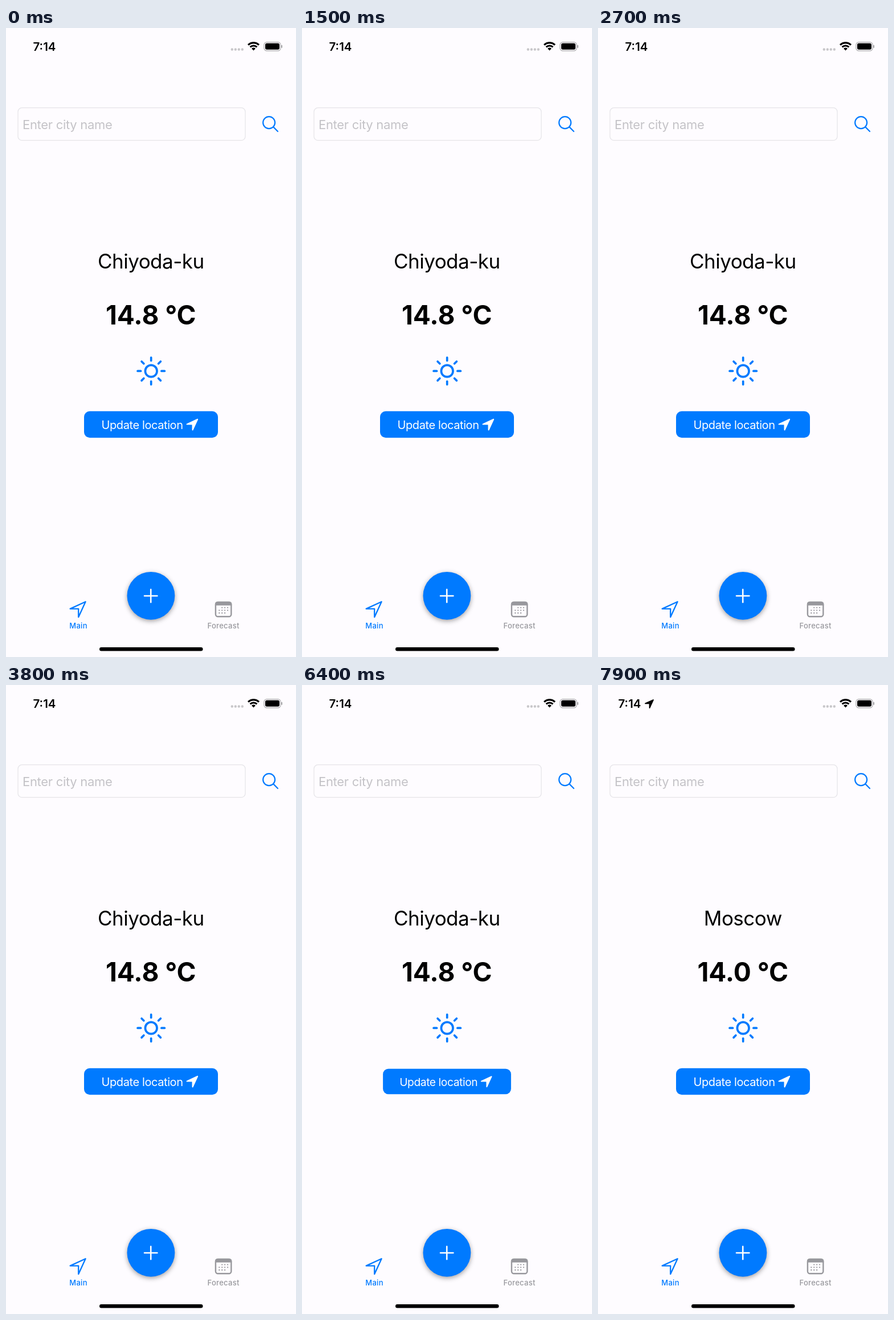
Recreate the animation shown at these times as an HTML page with a canvas. Size 509 by 1101 pixels, loop 8 s.

```html
<!DOCTYPE html>
<html lang="en">
<head>
<meta charset="utf-8">
<title>Weather app</title>
<style>
  html, body { margin: 0; width: 100%; height: 100%; overflow: hidden; background: #fefcff; }
  canvas { display: block; width: 509px; height: 1101px; }
</style>
</head>
<body>
<canvas id="stage"></canvas>
<script>
const W = 509, H = 1101, LOOP = 8000, STEP = 100;
const BG = '#fefcff', BLUE = '#007aff', GREY = '#98989d', BLACK = '#000', WHITE = '#fff';
const FORECAST_AT = 1600, MAIN_AT = 2500, PRESS_AT = 6300, UPDATE_AT = 6500;

const canvas = document.getElementById('stage');
const ratio = window.devicePixelRatio || 1;
canvas.width = W * ratio;
canvas.height = H * ratio;
const ctx = canvas.getContext('2d');

function text(str, x, y, size, { weight = 400, color = BLACK, align = 'left', spacing = 0 } = {}) {
  ctx.font = `${weight} ${size}px Inter, Roboto, sans-serif`;
  ctx.letterSpacing = spacing + 'px';
  ctx.textAlign = align;
  ctx.fillStyle = color;
  ctx.fillText(str, x, y);
}

function pen(color, width) {
  ctx.strokeStyle = color;
  ctx.lineWidth = width;
  ctx.lineCap = ctx.lineJoin = 'round';
}

function line(x1, y1, x2, y2) {
  ctx.beginPath();
  ctx.moveTo(x1, y1);
  ctx.lineTo(x2, y2);
  ctx.stroke();
}

function disc(x, y, r, color) {
  ctx.fillStyle = color;
  ctx.beginPath();
  ctx.arc(x, y, r, 0, Math.PI * 2);
  ctx.fill();
}

function ring(x, y, r) {
  ctx.beginPath();
  ctx.arc(x, y, r, 0, Math.PI * 2);
  ctx.stroke();
}

function box(x, y, w, h, r) {
  ctx.beginPath();
  ctx.roundRect(x, y, w, h, r);
}

function fillBox(x, y, w, h, r, color) {
  ctx.fillStyle = color;
  box(x, y, w, h, r);
  ctx.fill();
}

function arrow(x, y, size, color, width, solid) {
  ctx.beginPath();
  ctx.moveTo(x + size, y);
  ctx.lineTo(x, y + size * 0.46);
  ctx.lineTo(x + size * 0.54, y + size * 0.46);
  ctx.lineTo(x + size * 0.54, y + size);
  ctx.closePath();
  pen(color, width);
  ctx.stroke();
  if (solid) {
    ctx.fillStyle = color;
    ctx.fill();
  }
}

function wifi(x, y) {
  const mid = -Math.PI / 2, half = 0.76;
  ctx.fillStyle = BLACK;
  for (const [outer, inner] of [[15.4, 12.2], [10.2, 7], [5, 0]]) {
    ctx.beginPath();
    ctx.arc(x, y, outer, mid - half, mid + half);
    ctx.arc(x, y, inner, mid + half, mid - half, true);
    ctx.fill();
  }
}

function statusBar(located) {
  text('7:14', located ? 35.5 : 47.5, 40, 20.5, { weight: 600 });
  if (located) arrow(83, 26, 14, BLACK, 1.8, true);
  for (let i = 0; i < 4; i++) disc(396.8 + i * 6, 37.5, 2.2, '#c8c7ca');
  wifi(434.5, 39.6);
  pen('#a3a2a5', 1.2);
  box(453, 24.8, 29, 15, 4.6);
  ctx.stroke();
  fillBox(455, 26.8, 25, 11, 2.8, BLACK);
  fillBox(483.2, 29.8, 1.8, 5, 1, '#a3a2a5');
}

function searchRow() {
  pen('#e5e4e8', 1.2);
  box(21, 139.7, 399, 57, 7);
  ctx.stroke();
  text('Enter city name', 29, 176.5, 22, { color: '#c4c3c7', spacing: -0.3 });
  pen(BLUE, 2.2);
  ring(461.6, 165.6, 10.5);
  line(469.4, 173.4, 477, 181);
}

function sun(x, y) {
  pen(BLUE, 3.7);
  ring(x, y, 10.3);
  for (let i = 0; i < 8; i++) {
    const c = Math.cos(i * Math.PI / 4), s = Math.sin(i * Math.PI / 4);
    line(x + 18.2 * c, y + 18.2 * s, x + 23.6 * c, y + 23.6 * s);
  }
}

function pressScale(t) {
  const depth = 0.05, down = 150, settle = 136;
  const dt = t - PRESS_AT;
  if (dt < 0) return 1;
  if (dt < down) return 1 - depth * Math.sin(dt / down * Math.PI / 2);
  return 1 - depth * Math.exp((down - dt) / settle);
}

function updateButton(scale) {
  ctx.save();
  ctx.translate(254.5, 694);
  ctx.scale(scale, scale);
  fillBox(-117.5, -23.3, 235, 46.6, 10, BLUE);
  text('Update location', -87, 8, 20, { color: WHITE, spacing: -0.4 });
  arrow(63, -9, 18.6, WHITE, 2, true);
  ctx.restore();
}

function weather(t) {
  const updated = t >= UPDATE_AT;
  searchRow();
  text(updated ? 'Moscow' : 'Chiyoda-ku', 254.3, 420.5, 35, { align: 'center', spacing: -0.5 });
  text(updated ? '14.0 °C' : '14.8 °C', 254.3, 518.5, 46, { weight: 700, align: 'center' });
  sun(254.7, 600.4);
  updateButton(pressScale(t));
}

function calendar(color) {
  pen(color, 2.4);
  box(367.9, 1005, 27.4, 25.2, 4);
  ctx.stroke();
  fillBox(367, 1004, 29.2, 6.8, [4.5, 4.5, 0, 0], color);
  for (let i = 1; i < 11; i++) {
    disc(374.3 + (i % 4) * 4.9, 1014.6 + Math.floor(i / 4) * 4.7, 1.15, color);
  }
}

function tabBar(onMain) {
  const mainColor = onMain ? BLUE : GREY;
  const forecastColor = onMain ? GREY : BLUE;
  const label = { weight: 500, align: 'center', spacing: 0.3 };
  arrow(112.6, 1004.2, 27, mainColor, 2.3, false);
  text('Main', 127, 1051.3, 13, { ...label, color: mainColor });
  calendar(forecastColor);
  text('Forecast', 381.6, 1051.3, 13, { ...label, color: forecastColor });

  ctx.save();
  ctx.shadowColor = 'rgba(0,0,0,0.38)';
  ctx.shadowBlur = 8 * ratio;
  ctx.shadowOffsetY = 2.5 * ratio;
  disc(254.4, 993.8, 41.9, BLUE);
  ctx.restore();
  pen(WHITE, 2.6);
  line(243, 994, 265.4, 994);
  line(254.2, 982.8, 254.2, 1005.2);
  fillBox(164, 1084, 181.5, 6.5, 3.25, BLACK);
}

function draw(t) {
  const onMain = t < FORECAST_AT || t >= MAIN_AT;
  ctx.setTransform(ratio, 0, 0, ratio, 0, 0);
  ctx.fillStyle = BG;
  ctx.fillRect(0, 0, W, H);
  statusBar(t >= UPDATE_AT);
  if (onMain) weather(t);
  tabBar(onMain);
}

const start = performance.now();
function tick() {
  const t = (performance.now() - start) % LOOP;
  draw(Math.floor(t / STEP) * STEP);
  requestAnimationFrame(tick);
}
tick();
</script>
</body>
</html>
```
